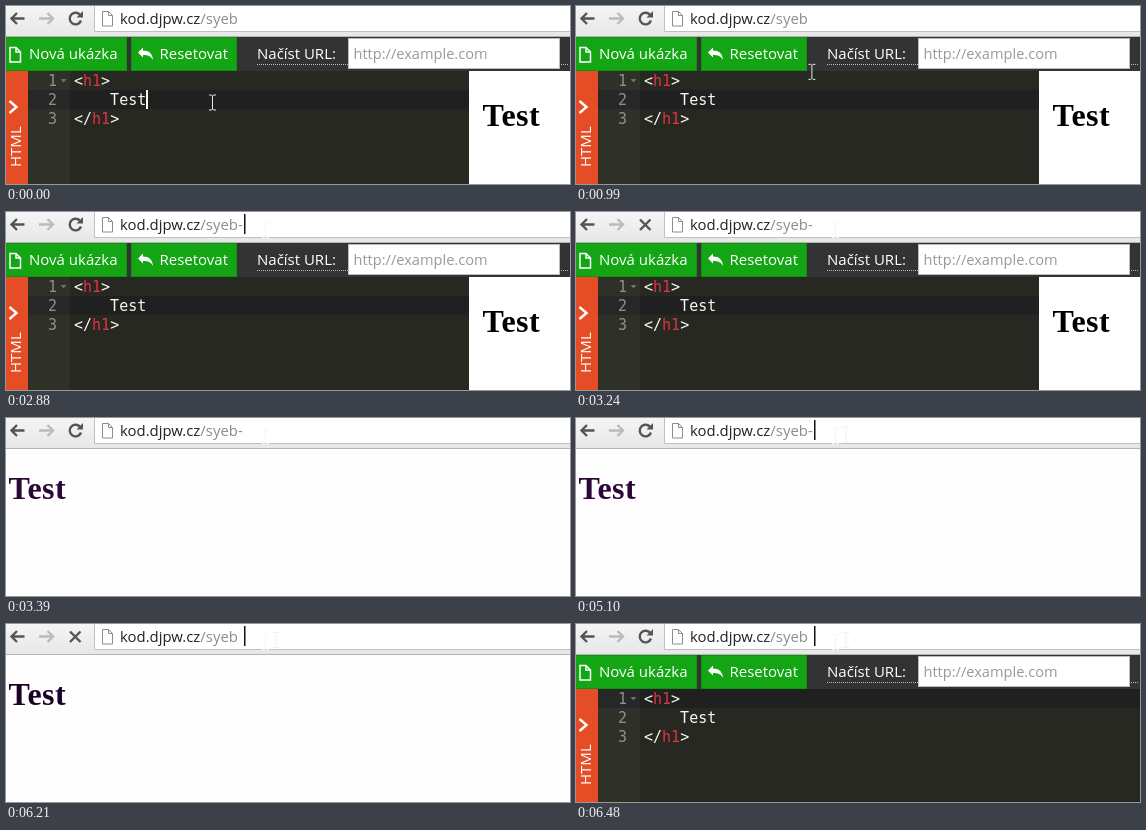
These frames come from a looping animation (564x178 px, 7.17 s). An HTML page:

```html
<!DOCTYPE html>
<html lang="cs">
<head>
<meta charset="utf-8">
<title>Live editor</title>
<style>
  html, body { margin: 0; width: 100%; height: 100%; overflow: hidden; background: #fff; }
  svg { display: block; width: 564px; height: 178px; }
  text { white-space: pre; font: 15px "Open Sans", "Noto Sans", sans-serif; }
  .code text { font: 15px "DejaVu Sans Mono", monospace; fill: #f8f8f2; }
  .code .num { fill: #8f908a; text-anchor: end; }
  .code .tag { fill: #e0343e; }
  .url text { font-size: 14.9px; }
  .title { font: bold 32px "Liberation Serif", serif; letter-spacing: .5px; }
  .line { fill: none; stroke-width: 2.4; }
</style>
</head>
<body>
<svg viewBox="0 0 564 178">
  <defs>
    <linearGradient id="chrome" x2="0" y2="1">
      <stop stop-color="#f5f5f5"/><stop offset="1" stop-color="#e7e7e7"/>
    </linearGradient>
    <path id="beam" d="M-3.5 -7.5h2.5l1 1l1 -1h2.5M0 -6.5v13M-3.5 7.5h2.5l1 -1l1 1h2.5" fill="none"/>
  </defs>

  <!-- Rendered page -->
  <g id="page">
    <rect y="31" width="564" height="147" fill="#fefefe"/>
    <text class="title" id="heading" x="2.500" y="81">Test</text>
  </g>

  <!-- Editor -->
  <g id="editor">
    <rect y="31" width="564" height="35" fill="#333"/>
    <g fill="#13a513" stroke="#0f930f">
      <rect x="-.5" y="31.500" width="121" height="33"/>
      <rect x="125.500" y="31.500" width="105" height="33"/>
    </g>
    <g fill="#fff">
      <text x="23" y="53">Nová ukázka</text>
      <text x="153.500" y="53">Resetovat</text>
      <text x="251" y="53">Načíst URL:</text>
      <path d="M132 46.500l5 -5v3c6 0 9.500 3 10 9.500c-2 -4 -5 -5 -10 -5v2.500z"/>
    </g>
    <path d="M4 41.500h6l4.500 4.500v10h-10.500zM10 41.500v4.500h4.500" fill="none" stroke="#fff" stroke-width="1.500"/>
    <path d="M251 58.500H563" stroke="#bbb" stroke-dasharray="1 1"/>
    <rect x="342.500" y="32.500" width="211" height="30" fill="#fff" stroke="#bbb"/>
    <text x="347.500" y="53" fill="#999" style="font-size:14.6px">http://example.com</text>

    <rect y="65" width="564" height="113" fill="#272822"/>
    <rect x="22" y="65" width="42" height="113" fill="#2f3129"/>
    <g id="row">
      <rect x="22" width="42" height="19" fill="#272727"/>
      <rect x="64" width="500" height="19" fill="#202020"/>
    </g>
    <rect y="65" width="22" height="113" fill="#e44d26"/>
    <path class="line" d="M3.500 95l7 6l-7 6" stroke="#fff"/>
    <text transform="translate(14.500 161) rotate(-90)" fill="#fff">HTML</text>
    <g class="code">
      <text class="num" x="51" y="80">1</text>
      <text class="num" x="51" y="99">2</text>
      <text class="num" x="51" y="118">3</text>
      <path d="M54.500 73h6l-3 3.500z" fill="#6f7068"/>
      <text x="68" y="80">&lt;<tspan class="tag">h1</tspan>&gt;</text>
      <text x="68" y="99">    Test</text>
      <text x="68" y="118">&lt;/<tspan class="tag">h1</tspan>&gt;</text>
    </g>
    <rect id="codeCaret" x="140" y="84" width="2" height="19" fill="#f8f8f0"/>
    <g id="preview">
      <rect x="463" y="65" width="101" height="113" fill="#fff"/>
      <text class="title" x="476.500" y="120">Test</text>
    </g>
  </g>

  <!-- Browser bar -->
  <rect width="564" height="30" fill="url(#chrome)"/>
  <rect y="30" width="564" height="1" fill="#b4b4b4"/>
  <path d="M88.500 -1V25.500H565V-1z" fill="#fff" stroke="#c0c0c0"/>
  <path class="line" d="M18.500 12.500H6M11 7l-5.500 5.500l5.500 5.500" stroke="#555"/>
  <path class="line" d="M33 12.500H46M41.500 7l5.500 5.500l-5.500 5.500" stroke="#bbb"/>
  <g id="reload">
    <path class="line" d="M74.500 9.500A5.800 5.800 0 1 0 75 14.500" stroke="#555"/>
    <path d="M77 5v6.500h-6.500z" fill="#555"/>
  </g>
  <path id="stop" class="line" d="M64 7.500l10.500 10.500M74.500 7.500l-10.500 10.500" stroke="#555"/>
  <path d="M96.500 5.500h6l4 4v10.500h-10zM102.500 5.500v4h4" fill="#fff" stroke="#8c8c8c"/>
  <g class="url">
    <rect id="selection" x="114" y="1" height="21" fill="#3399ff"/>
    <text x="114" y="18"><tspan id="host">kod.djpw.cz</tspan><tspan id="path"></tspan></text>
    <rect id="urlCaret" y="2" width="1.500" height="20" fill="#111"/>
  </g>

  <use id="ghost" href="#beam" x="270" y="16" stroke="#eee"/>
  <use id="cursor" href="#beam"/>
</svg>
<script>
  const LOOP = 7170;
  const $ = id => document.getElementById(id);
  const show = (id, on) => $(id).style.display = on ? "" : "none";
  const set = (id, attrs) => {
    for (const key in attrs) $(id).setAttribute(key, attrs[key]);
  };

  const ease = (t, a, b) => {
    const p = Math.min(1, Math.max(0, (Math.floor(t / 30) * 30 + 30 - a) / (b + 30 - a)));
    return 1 - (1 - p) ** 1.5;
  };

  function draw(t) {
    const within = (a, b) => t >= a && t < b;
    const onPage = within(3330, 6270);
    const loading = within(2940, 3390) || within(5850, 6480);
    const selected = within(1620, 2370) || within(4800, 5010);
    const dash = within(2880, 5790);

    show("page", onPage);
    show("editor", !onPage);
    show("preview", t < 3330);
    set("heading", { fill: t < 5850 ? "#2b0636" : "#1b0028" });
    set("row", { transform: `translate(0 ${t < 3330 ? 84 : 65})` });
    show("codeCaret", t < 510 || within(1050, 1260));

    show("stop", loading);
    show("reload", !loading);
    show("selection", selected);
    set("selection", { width: dash ? 124 : 118 });
    $("path").textContent = dash ? "/syeb-" : "/syeb";
    set("host", { fill: selected ? "#fff" : "#222" });
    set("path", { fill: selected ? "#fff" : "#8c8c8c" });
    show("urlCaret", within(2370, 3240) || within(4620, 4800) || t >= 5010);
    set("urlCaret", { x: t < 2880 ? 232 : 238 });

    // Right along the line, up into the address field, then settle inside it
    const right = ease(t, 510, 780), up = ease(t, 930, 1260), settle = t >= 1860;
    const x = 206.5 + 25 * right + 12.5 * up + 15.5 * settle;
    const y = 96.5 - 4 * right - 76 * up + 1.5 * settle;
    set("cursor", {
      transform: `translate(${x} ${y})`,
      stroke: up < 1 ? "#e4e4e4" : settle ? "#f4f4f4" : "#fff"
    });
    show("ghost", t >= 4620);
  }

  const start = performance.now();
  function tick() {
    draw((performance.now() - start) % LOOP);
    requestAnimationFrame(tick);
  }
  tick();
</script>
</body>
</html>
```
